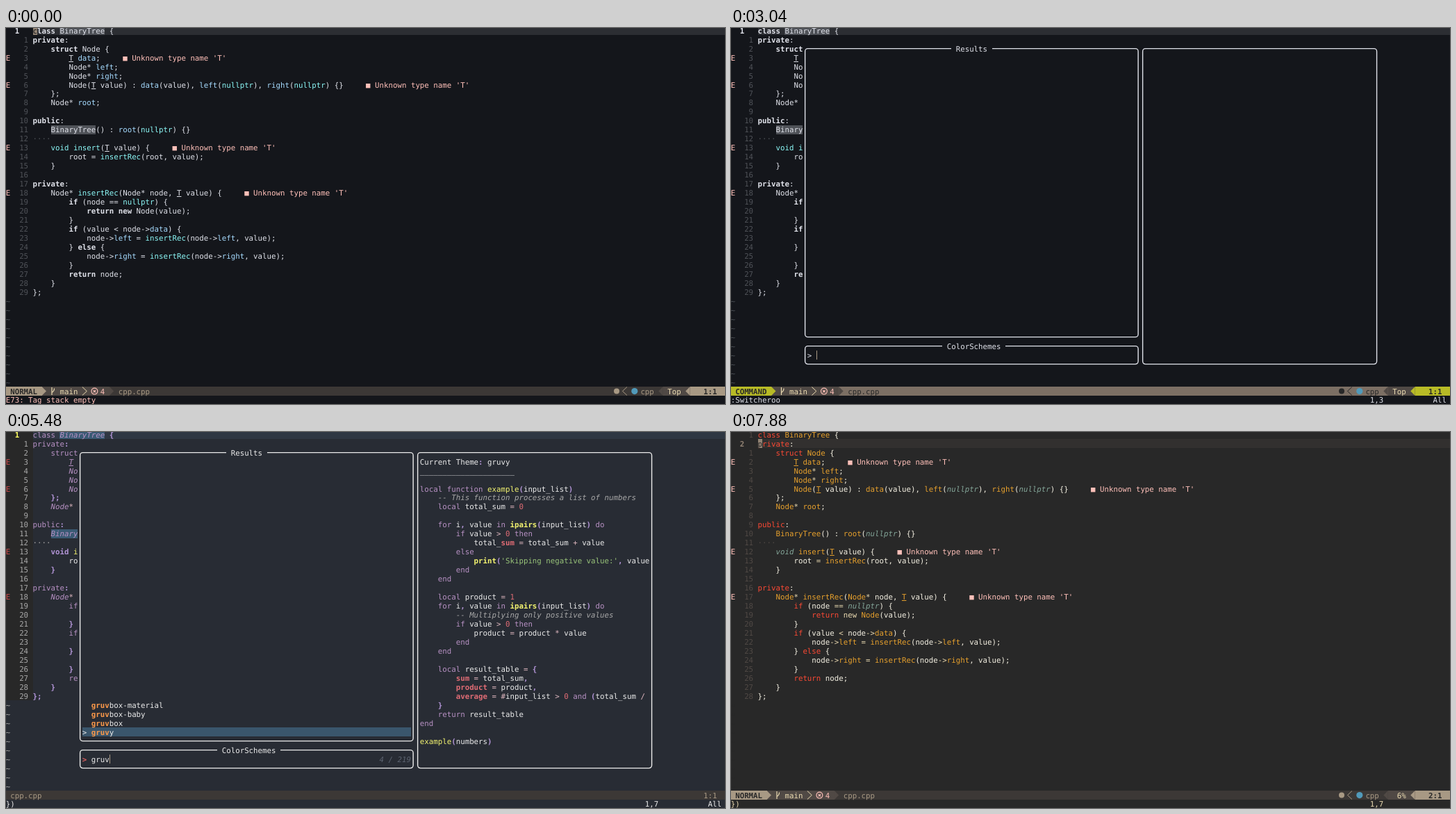
Recreate the animation shown at these times as an HTML page with a canvas. Size 1035 by 541 pixels, loop 8000 ms.

```html
<!DOCTYPE html>
<html lang="en">
<head>
<meta charset="utf-8">
<title>Colour scheme picker</title>
<style>
html, body { margin: 0; width: 100%; height: 100%; overflow: hidden; background: #14161b; }
canvas { display: block; }
</style>
</head>
<body>
<canvas id="stage" width="1035" height="541"></canvas>
<script>
const ctx = document.getElementById('stage').getContext('2d');
const LOOP = 8000, W = 6.48, H = 12.97;
const x = col => col * W - 0.3;
const y = row => row * H - 2.8;

// Styles are "colour flags": b bold, i italic, u underlined
const themes = {
  default: {
    bg: '#14161b', fg: '#e0e2ea', ui: '#e0e2ea', line: '#2c2e33', ref: '#4f5258', num: '#4f5258',
    cur: '#e0e2ea b', tilde: '#4f5258', err: '#ffc0b9', prompt: '#e0e2ea',
    kw: '#e0e2ea b', nw: '#e0e2ea b', vd: '#8cf8f7', nil: '#8cf8f7', func: '#8cf8f7',
    field: '#a6dbff', tparam: '#e0e2ea u'
  },
  OceanicNext: {
    bg: '#1b2b34', fg: '#d8dee9', ui: '#d8dee9', line: '#343d46', nrBg: '#343d46', ref: '#4f5b66', num: '#65737e',
    cur: '#65737e', tilde: '#d8dee9', err: '#ec5f67', prompt: '#62b3b2', sel: '#4f5b66', count: '#65737e',
    kw: '#c594c5', vd: '#62b3b2', func: '#6699cc', builtin: '#6699cc', type: '#fac863', tparam: '#d8dee9 u',
    op: '#f99157', punct: '#62b3b2', brace: '#62b3b2', numb: '#f99157', str: '#99c794', com: '#65737e',
    table: '#d8dee9'
  },
  gruvy: {
    bg: '#282c34', fg: '#ebebeb', ui: '#ebebeb', line: '#2f3743', gutter: '#282828', ref: '#3a5a74', num: '#a8a8a8',
    cur: '#ffff5f b', tilde: '#a8a8a8', err: '#cc4a4a', prompt: '#e06060 b', sel: '#3a566c', count: '#5c6370 i',
    match: '#fe9a4a b', kw: '#b891c4', vd: '#b294d6 b', func: '#f4f470', builtin: '#f4f470 b', type: '#b891c4 i',
    tparam: '#b891c4 iu', punct: '#b294d6 b', brace: '#b294d6 b', table: '#b294d6 b', numb: '#e06c75',
    str: '#98c379', com: '#a8a8a8 i', key: '#e06c75 b', op: '#e0b8c0'
  },
  gruvbox: {
    bg: '#282828', fg: '#f5f1e3', ui: '#ebdbb2', line: '#32302f', ref: '#504945', num: '#504945',
    cur: '#928374 b', tilde: '#282828', err: '#ffc0b9', prompt: '#e6a02d', sel: '#504945', count: '#665c54',
    match: '#83a598 i', kw: '#fb4934', nw: '#ebdbb2', vd: '#83a598 i', nil: '#83a598 i', func: '#e6a02d',
    builtin: '#e6a02d i', type: '#e6a02d', tparam: '#e6a02d u', field: '#e6a02d', key: '#e6a02d', op: '#ebdbb2',
    numb: '#fabd2f', str: '#98971a', com: '#665c54 i', table: '#83a598 i'
  }
};

const code = `class BinaryTree {
private:
    struct Node {
        T data;
        Node* left;
        Node* right;
        Node(T value) : data(value), left(nullptr), right(nullptr) {}
    };
    Node* root;

public:
    BinaryTree() : root(nullptr) {}

    void insert(T value) {
        root = insertRec(root, value);
    }

private:
    Node* insertRec(Node* node, T value) {
        if (node == nullptr) {
            return new Node(value);
        }
        if (value < node->data) {
            node->left = insertRec(node->left, value);
        } else {
            node->right = insertRec(node->right, value);
        }
        return node;
    }
};`.split('\n');

const sample = `local function example(input_list)
    -- This function processes a list of numbers
    local total_sum = 0

    for i, value in ipairs(input_list) do
        if value > 0 then
            total_sum = total_sum + value
        else
            print('Skipping negative value:', value)
        end
    end

    local product = 1
    for i, value in ipairs(input_list) do
        -- Multiplying only positive values
        if value > 0 then
            product = product * value
        end
    end

    local result_table = {
        sum = total_sum,
        product = product,
        average = #input_list > 0 and (total_sum / #input_list)
    }
    return result_table
end

example(numbers)`.split('\n');

const cpp = /(?<kw>\b(?:class|private|public|struct|if|else|return)\b)|(?<nw>\bnew\b)|(?<vd>void)|(?<nil>nullptr)|(?<type>BinaryTree|Node)|(?<tparam>\bT\b)|(?<func>insertRec|insert)|(?<field>\b(?:data|left|right)\b|root(?=;|\(n))|(?<op>->|[=<*]+)|(?<brace>[{}])|(?<punct>[();:,])/g;
const lua = /(?<com>--.*)|(?<str>'[^']*')|(?<kw>\b(?:local|function|for|in|do|if|then|else|end|return|and)\b)|(?<builtin>ipairs|print)|(?<func>example)|(?<key>sum(?= = t)|product(?= = product,)|average)|(?<numb>\b\d+\b)|(?<op>[=+*\/>#])|(?<table>[{}])|(?<punct>[(),:])/g;

// Result lists run from the best match at the bottom upwards
const words = s => s.trim().split(/\s+/);
const lists = {
  '': words(`OceanicNext OceanicNextLight abscs adwaita alduin apprentice aquarium arctic ariake aurora bamboo
    bamboo-light bamboo-multiplex bamboo-vulgaris blue blue-moon bluloco bluloco-dark bluloco-light boo calvera
    carbonfox catppuccin catppuccin-frappe catppuccin-latte catppuccin-macchiato catppuccin-mocha chocolatier
    citruszest cobalt2 codedark`),
  g: words(`gruvy gruvbox github_dark github_light gruvbox-baby gruvbox-material github_dark_dimmed
    github_dark_default github_light_default github_dark_colorblind github_dark_tritanopia github_light_colorblind
    github_light_tritanopia github_dark_high_contrast github_light_high_contrast edge evening melange morning
    kanagawa midnight nightfly nightfox onelight vimlight vn-night night-owl nightcity palenight evergarden nvimgelion`),
  gr: words(`gruvy gruvbox gruvbox-baby gruvbox-material github_dark github_dark_dimmed github_dark_default
    github_dark_colorblind github_dark_tritanopia github_light_colorblind github_light_tritanopia
    github_dark_high_contrast github_light_high_contrast evergarden kanagawa-paper kanagawa-dragon
    material-lighter tokyonight-storm nightcity-afterlife Tomorrow-Night-Bright`),
  gruv: words('gruvy gruvbox gruvbox-baby gruvbox-material')
};
const totals = { '': 219, g: 57, gr: 20, gruv: 4 };

function fill(row, col, cols, color, rows = 1) {
  const left = Math.round(x(col)), top = Math.round(y(row));
  ctx.fillStyle = color;
  ctx.fillRect(left, top, Math.round(x(col + cols)) - left, Math.round(y(row + rows)) - top);
}

function put(row, col, text, style) {
  const [color, flags = ''] = style.split(' ');
  const base = y(row) + 10.5;
  ctx.font = `${flags.includes('i') ? 'italic ' : ''}${flags.includes('b') ? 'bold ' : ''}10.763px "DejaVu Sans Mono", monospace`;
  ctx.fillStyle = color;
  [...text].forEach((ch, i) => { if (ch !== ' ') ctx.fillText(ch, x(col + i), base); });
  if (flags.includes('u')) ctx.fillRect(x(col), Math.round(base + 1), W * text.length, 1);
}

function paint(row, col, line, syntax, th) {
  let pos = 0;
  for (const m of line.matchAll(syntax)) {
    const kind = Object.keys(m.groups).find(k => m.groups[k]);
    put(row, col + pos, line.slice(pos, m.index), th.fg);
    put(row, col + m.index, m[0], th[kind] || th.fg);
    pos = m.index + m[0].length;
  }
  put(row, col + pos, line.slice(pos), th.fg);
}

function stroke(color, width, path) {
  ctx.strokeStyle = color;
  ctx.lineWidth = width;
  ctx.beginPath();
  path();
  ctx.stroke();
}

function dot(cx, cy, r, color) {
  ctx.fillStyle = color;
  ctx.beginPath();
  ctx.arc(cx, cy, r, 0, 7);
  ctx.fill();
}

function editor(th, row, showRef, showCursor) {
  if (th.gutter) fill(0, 0, 6, th.gutter, code.length);
  fill(row, 6, 155, th.line);
  if (th.nrBg) fill(row, 2, 4, th.nrBg);
  if (showRef) {
    fill(0, 12, 10, th.ref);
    fill(11, 10, 10, th.ref);
  }
  code.forEach((line, i) => {
    if (i === row) put(i, 2, String(i + 1), th.cur);
    else put(i, 2, String(Math.abs(i - row)).padStart(3), th.num);
    paint(i, 6, line, cpp, th);
    if (/\bT\b/.test(line)) {
      put(i, 0, 'E', th.err);
      put(i, line.length + 11, "■ Unknown type name 'T'", th.err);
    }
  });
  put(12, 6, '····', th.num);
  for (let r = code.length; r < 40; r++) put(r, 0, '~', th.tilde);
  if (showCursor) {
    fill(row, 6, 1, '#928374');
    put(row, 6, code[row][0], th.bg);
  }
}

function arrow(col, dir, color) {
  const a = x(dir > 0 ? col : col + 1), top = Math.round(y(40));
  ctx.fillStyle = color;
  ctx.beginPath();
  ctx.moveTo(a, top);
  ctx.lineTo(a + dir * W, top + 6.5);
  ctx.lineTo(a, top + 13);
  ctx.fill();
}

function chevron(col, dir, color) {
  const a = x(dir > 0 ? col : col + 1), top = y(40);
  stroke(color, 1, () => {
    ctx.moveTo(a, top + 0.5);
    ctx.lineTo(a + dir * W, top + 6.5);
    ctx.lineTo(a, top + 12.5);
  });
}

function statusLine(mode, place, pos) {
  const command = mode === 'COMMAND';
  const main = command ? '#b8bb26' : '#a89984', mid = '#504945', light = '#ebdbb2', dark = '#282828';
  const back = command ? '#7c6f64' : '#3c3836', dim = command ? dark : '#a89984';
  const c = mode.length + 2, cy = y(40) + 6.6, pink = '#ffc0b9';
  fill(40, 0, 160, back);
  fill(40, 0, c, main);
  put(40, 1, mode, main === back ? light : dark + ' b');
  fill(40, c, 15, mid);
  arrow(c, 1, main);
  const bx = x(c + 2) + 1.5;
  stroke(light, 1.2, () => {
    ctx.moveTo(bx, cy - 5.5);
    ctx.lineTo(bx, cy + 5.5);
    ctx.moveTo(bx, cy + 2);
    ctx.quadraticCurveTo(bx + 3.5, cy, bx + 3.5, cy - 4);
  });
  put(40, c + 4, 'main', light);
  chevron(c + 9, 1, light);
  const ex = x(c + 11) + 4.6;
  stroke(pink, 1.2, () => {
    ctx.arc(ex, cy, 4.4, 0, 7);
    for (const d of [-1, 1]) {
      ctx.moveTo(ex - 1.8, cy - 1.8 * d);
      ctx.lineTo(ex + 1.8, cy + 1.8 * d);
    }
  });
  put(40, c + 13, '4', pink);
  arrow(c + 15, 1, mid);
  put(40, c + 17, 'cpp.cpp', dim);
  dot(879, cy, 4, dim);
  chevron(137, -1, dim);
  dot(904.8, cy, 4.6, '#519aba');
  put(40, 141, 'cpp', dim);
  arrow(145, -1, mid);
  fill(40, 146, 6, mid);
  put(40, 147, place, light);
  arrow(151, -1, main);
  fill(40, 152, 8, main);
  put(40, 155, pos, dark + ' b');
}

function inactiveLine() {
  fill(40, 0, 160, '#3c3836');
  put(40, 1, 'cpp.cpp', '#a89984');
  put(40, 155, '1:1', '#a89984');
}

function frameBox(top, left, bottom, right, th, title) {
  const l = x(left + 0.5), t = y(top + 0.5);
  stroke(th.ui, 1.4, () => ctx.roundRect(l, t, (right - left) * W, (bottom - top) * H, 4));
  if (!title) return;
  const col = Math.round((left + right - title.length) / 2 + 0.5);
  fill(top, col - 1, title.length + 2, th.bg);
  put(top, col, title, th.ui);
}

function picker(th, name, query, chosen) {
  fill(2, 16, 128, th.bg, 36);
  frameBox(2, 16, 34, 90, th, 'Results');
  frameBox(35, 16, 37, 90, th, 'ColorSchemes');
  frameBox(2, 91, 37, 143, th);
  put(36, 17, '>', th.prompt);
  put(36, 19, query, th.ui);
  ctx.fillStyle = '#a89984';
  ctx.fillRect(Math.round(x(19 + query.length)), y(36), 1, H);
  if (name === 'default') return;

  put(36, 81, `${totals[query]} / 219`.padStart(9), th.count);
  lists[query].forEach((item, i) => {
    const row = 33 - i;
    if (i === chosen) {
      fill(row, 17, 73, th.sel);
      put(row, 17, '>', th.ui);
    }
    let hit = 0;
    [...item].forEach((ch, k) => {
      const match = ch === query[hit];
      if (match) hit++;
      put(row, 19 + k, ch, match ? th.match : th.ui);
    });
  });
  paint(3, 92, 'Current Theme: ' + name, lua, th);
  put(4, 92, '_'.repeat(21), th.fg);
  sample.forEach((line, i) => paint(6 + i, 92, line.slice(0, 51), lua, th));
}

function menu(chosen) {
  ['Sleuth', 'Stdheader', 'Switcheroo'].forEach((item, i) => {
    const on = i === chosen;
    fill(38 + i, 0, 16, on ? '#e0e2ea' : '#2c2e33');
    put(38 + i, 1, item, on ? '#2c2e33' : '#e0e2ea');
  });
}

// Value of the latest step that has begun
const at = (t, ...steps) => steps.filter(s => s[0] <= t).pop()[1];

function draw(t) {
  const name = at(t, [0, 'default'], [3120, 'OceanicNext'], [5120, 'gruvy'], [6440, 'gruvbox']);
  const th = themes[name];
  const picking = t >= 3040 && t < 6880;
  const row = t < 7520 ? 0 : 1;
  ctx.fillStyle = th.bg;
  ctx.fillRect(0, 0, 1035, 541);

  editor(th, row, t < 6880 || (t >= 7080 && t < 7520), t < 400 || t >= 6880);
  if (picking && t >= 3120) inactiveLine();
  else statusLine(t >= 1360 && t < 3120 ? 'COMMAND' : 'NORMAL', t < 7880 ? 'Top' : ' 6%', t < 7880 ? '1:1' : '2:1');
  if (t >= 1200 && t < 3040) menu(at(t, [1200, 0], [1920, 1], [2280, 2]));

  const cmd = at(t, [0, 'E73: Tag stack empty'], [400, ':'], [840, ':S'], [1200, ':Sleuth'],
    [1920, ':Stdheader'], [2280, ':Switcheroo'], [5120, '})']);
  put(41, 0, cmd, t < 400 ? th.err : th.ui);
  if (t >= 400 && t < 3040) fill(41, cmd.length, 1, '#928374');
  if (t >= 3040) {
    put(41, 142, at(t, [3040, '1,3'], [5120, '1,4'], [5320, '1,5'], [5480, '1,7']), th.ui);
    if (t < 7520) put(41, 156, 'All', th.ui);
  }
  if (picking) {
    const query = at(t, [0, ''], [5120, 'g'], [5320, 'gr'], [5480, 'gruv']);
    picker(th, name, query, t < 6440 ? 0 : 1);
  }
}

ctx.textRendering = 'geometricPrecision';
const start = performance.now();
function tick() {
  draw((performance.now() - start) % LOOP);
  requestAnimationFrame(tick);
}
tick();
</script>
</body>
</html>
```
